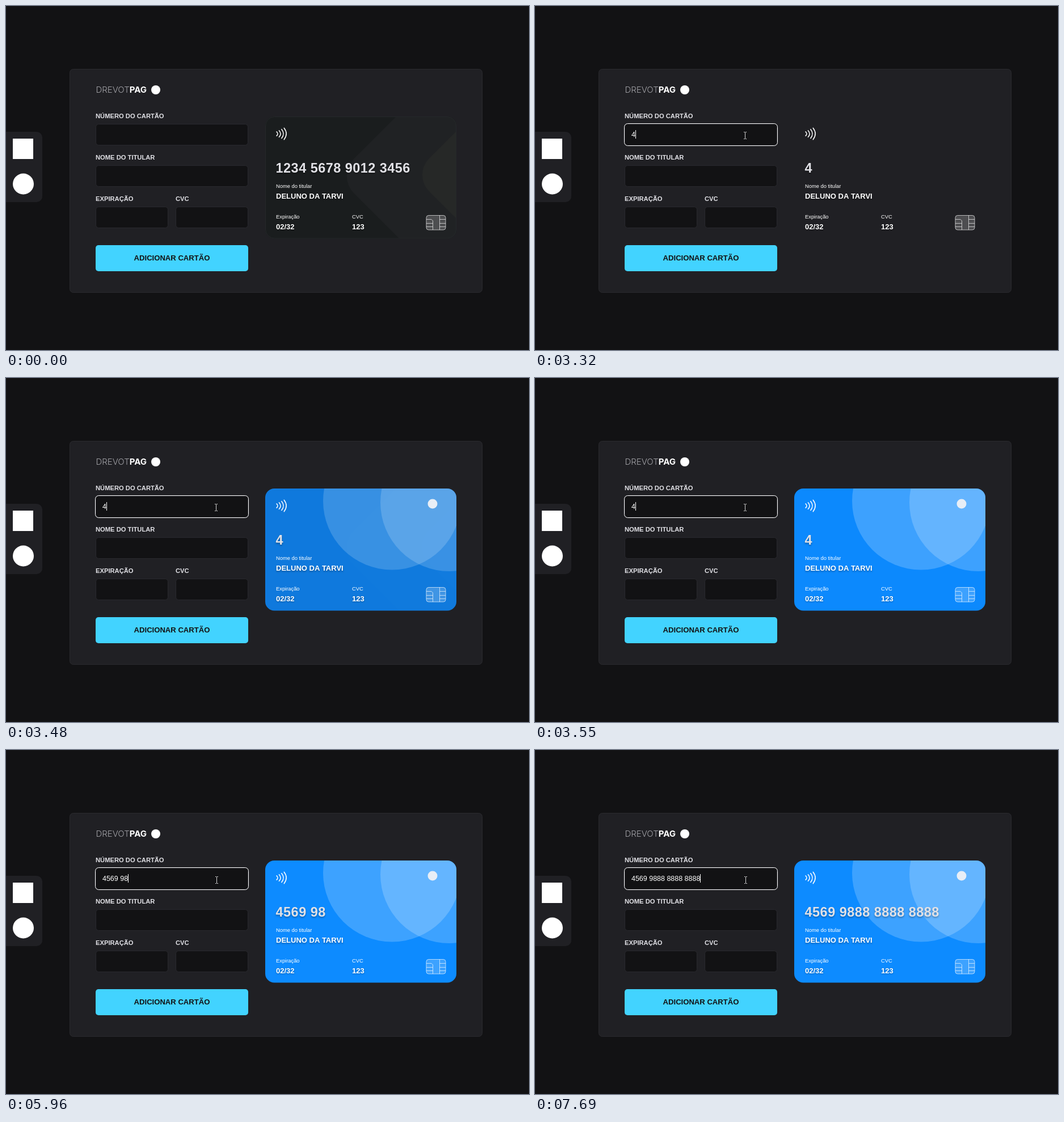
These frames come from a looping animation (922 by 607 pixels, 8 s). An HTML page with a canvas:

```html
<!DOCTYPE html>
<html lang="pt-BR">
<head>
<meta charset="utf-8">
<title>Cartão</title>
<style>
html, body { margin: 0; width: 100%; height: 100%; overflow: hidden; background: #121214; }
canvas { display: block; }
</style>
</head>
<body>
<canvas id="stage" width="922" height="607"></canvas>
<script>
const ctx = document.getElementById('stage').getContext('2d');
const LOOP = 8000;
const SANS = '"Liberation Sans", Arial, sans-serif';
const NUMBER = '4569 9888 8888 8888';

// [time, visible characters of NUMBER]
const typed = [
  [0, 0], [3190, 1], [4490, 2], [4880, 3], [5430, 4], [5560, 6], [5960, 7], [6090, 8],
  [6490, 9], [6620, 11], [6750, 12], [6900, 13], [7010, 14],
  [7230, 16], [7360, 17], [7490, 18], [7690, 19]
];
const caretOn = [[2130, 2680], [3190, 3940], [4420, 5360], [5430, LOOP]];
// [time, x, y] of the text cursor
const beam = [
  [910, 394, 230], [1370, 388, 229], [1440, 376, 227], [1510, 370, 226],
  [1710, 369, 226], [2460, 369, 227], [2660, 370, 227], [2860, 370, 228], [3700, 371, 229]
];

const last = (rows, t) => rows.filter(r => r[0] <= t).pop();

function box(x, y, w, h, r, fill, line) {
  ctx.beginPath();
  ctx.roundRect(x, y, w, h, r);
  if (fill) { ctx.fillStyle = fill; ctx.fill(); }
  if (line) { ctx.strokeStyle = line; ctx.lineWidth = 1; ctx.stroke(); }
}

function disc(x, y, r, fill) {
  ctx.beginPath();
  ctx.arc(x, y, r, 0, Math.PI * 2);
  ctx.fillStyle = fill;
  ctx.fill();
}

function text(str, x, y, font, fill, spacing = 0, align = 'left') {
  ctx.font = font;
  ctx.fillStyle = fill;
  ctx.textAlign = align;
  ctx.letterSpacing = spacing + 'px';
  ctx.fillText(str, x, y);
}

function line(...pts) {
  ctx.beginPath();
  for (let i = 0; i < pts.length; i += 2) ctx.lineTo(pts[i], pts[i + 1]);
  ctx.stroke();
}

function brand() {
  text('DREVOT', 158.5, 152.5, '300 15px Inter, sans-serif', '#a3a3a8');
  const w = ctx.measureText('DREVOT').width;
  text('PAG', 158.5 + w, 152.5, '700 15px Inter, sans-serif', '#fff');
  disc(264, 148, 8, '#fff');
}

function sidebar() {
  box(0, 222, 64, 124, [0, 10, 10, 0], '#202024');
  box(12, 234, 36, 36, 0, '#fff');
  disc(30.5, 314, 18.5, '#fff');
}

function field(label, x, y, w) {
  text(label, x, y - 10, `bold 11.2px ${SANS}`, '#e1e1e6');
  box(x + .5, y + .5, w - 1, 37, 5, '#121214', '#29292e');
}

function form(t) {
  field('NÚMERO DO CARTÃO', 158, 208, 269);
  field('NOME DO TITULAR', 158, 281, 269);
  field('EXPIRAÇÃO', 158, 354, 128);
  field('CVC', 299, 354, 128);
  box(158, 422, 269, 46, 5, '#42d3ff');
  text('ADICIONAR CARTÃO', 292.5, 449, `bold 13.1px ${SANS}`, '#121214', 0, 'center');

  if (t >= 2130) {
    const line = t < 2200 ? '#8d8d92' : '#fff';
    box(157.5, 207.5, 270, 39, 6, null, line);
  }
  const str = NUMBER.slice(0, last(typed, t)[1]);
  text(str, 170, 231, `12.48px ${SANS}`, '#fff');
  if (caretOn.some(([a, b]) => t >= a && t < b)) {
    const w = str ? ctx.measureText(str).width : 0;
    ctx.fillStyle = '#fff';
    ctx.fillRect(Math.round(170 + w), 219, 1, 15);
  }
}

function chevron(top, tipX, tipY, r, fill) {
  const d = 130;
  ctx.beginPath();
  ctx.moveTo(tipX + d, tipY - d);
  ctx.arcTo(tipX, tipY, tipX + d, tipY + d, r);
  ctx.lineTo(tipX + d, tipY + d);
  ctx.lineTo(820, tipY + d);
  ctx.lineTo(820, tipY - d);
  ctx.fillStyle = fill;
  ctx.fill();
}

function cardFace(blue, alpha) {
  ctx.save();
  ctx.globalAlpha = alpha;
  ctx.beginPath();
  ctx.roundRect(457, 195, 337, 215.5, 16);
  ctx.clip();
  ctx.fillStyle = blue ? '#0d8bff' : '#1a1d1e';
  ctx.fillRect(457, 195, 337, 216);
  if (blue) {
    disc(680.5, 217, 121.5, 'rgba(255,255,255,.2)');
    disc(781.5, 219.5, 121.5, 'rgba(255,255,255,.2)');
  } else {
    chevron(195, 583, 300, 43, '#202224');
    chevron(221, 717, 298, 41, '#262827');
    box(457.5, 195.5, 336, 214.5, 16, null, '#25282a');
  }
  ctx.restore();
}

function waves() {
  ctx.strokeStyle = '#fff';
  ctx.lineWidth = 1.5;
  ctx.lineCap = 'round';
  for (let i = 0; i < 4; i++) {
    const x = 477 + i * 4.4, h = 3.6 + i * 2.2, bulge = 4 + i * 1.3;
    ctx.beginPath();
    ctx.moveTo(x, 225.5 - h);
    ctx.quadraticCurveTo(x + bulge, 225.5, x, 225.5 + h);
    ctx.stroke();
  }
  ctx.lineCap = 'butt';
}

function chip() {
  box(741, 369.5, 34, 25.5, 4, 'rgba(255,255,255,.2)', 'rgba(255,255,255,.65)');
  line(741, 376.5, 750, 376.5, 752.5, 379, 752.5, 395);
  line(764.5, 369.5, 764.5, 395);
  for (const y of [383.5, 389.5]) line(741, y, 752.5, y);
  for (const y of [376.5, 383.5, 389.5]) line(764.5, y, 775, y);
}

function card(t) {
  const empty = t < 3190;
  if (empty) cardFace(false, 1);
  if (t >= 3410) {
    const k = Math.floor((t - 3410) / 70) + 1;
    const mix = 1 - (1 - Math.min(1, k * 70 / 230)) ** 2;
    if (mix < 1) cardFace(false, 1);
    cardFace(true, mix);
    disc(752, 222, 8.5, '#e8eef6');
  }
  waves();
  chip();

  const bold = `bold 13px ${SANS}`, small = `9.36px ${SANS}`;
  const num = empty ? '1234 5678 9012 3456' : NUMBER.slice(0, last(typed, t)[1]);
  ctx.save();
  ctx.shadowColor = 'rgba(0,0,0,.3)';
  ctx.shadowOffsetY = 1.5;
  ctx.shadowBlur = 3;
  text(num, 475.6, 294, `bold 23.4px ${SANS}`, '#e1e1e6', .5);
  text('DELUNO DA TARVI', 476, 340, bold, '#fff');
  text('02/32', 476, 393.5, bold, '#fff');
  text('123', 610, 393.5, bold, '#fff');
  ctx.restore();
  text('Nome do titular', 476, 321, small, '#fff');
  text('Expiração', 476, 375, small, '#fff');
  text('CVC', 610, 375, small, '#fff');
}

function arrow(x, y) {
  const p = [0, 0, 0, 15, 3.5, 11.8, 6, 17.3, 8.3, 16.3, 5.9, 11, 10.7, 11];
  ctx.beginPath();
  for (let i = 0; i < p.length; i += 2) ctx.lineTo(x + p[i], y + p[i + 1]);
  ctx.closePath();
  ctx.fillStyle = '#fff';
  ctx.fill();
  ctx.strokeStyle = '#000';
  ctx.lineWidth = 1;
  ctx.stroke();
}

function pointer(t) {
  if (t < 370) return;
  if (t < 910) {
    const p = (Math.floor((t - 370) / 77) + .1) / 7;
    const e = 1 - (1 - p) ** 2;
    arrow(843 - 449 * e, 595 - 365 * e);
    return;
  }
  const [, x, y] = last(beam, t);
  ctx.strokeStyle = '#d4d4d4';
  ctx.lineWidth = 1;
  line(x + .5, y - 5, x + .5, y + 6);
  for (const dy of [-5.5, 6.5]) {
    line(x - 2, y + dy, x, y + dy);
    line(x + 1, y + dy, x + 3, y + dy);
  }
}

function draw(t) {
  ctx.fillStyle = '#121214';
  ctx.fillRect(0, 0, 922, 607);
  box(112.5, 111.5, 727, 394, 6, '#202024', '#2a2a2e');
  sidebar();
  brand();
  form(t);
  card(t);
  pointer(t);
}

const start = performance.now();
function tick() {
  draw((performance.now() - start) % LOOP);
  requestAnimationFrame(tick);
}
tick();
</script>
</body>
</html>
```
